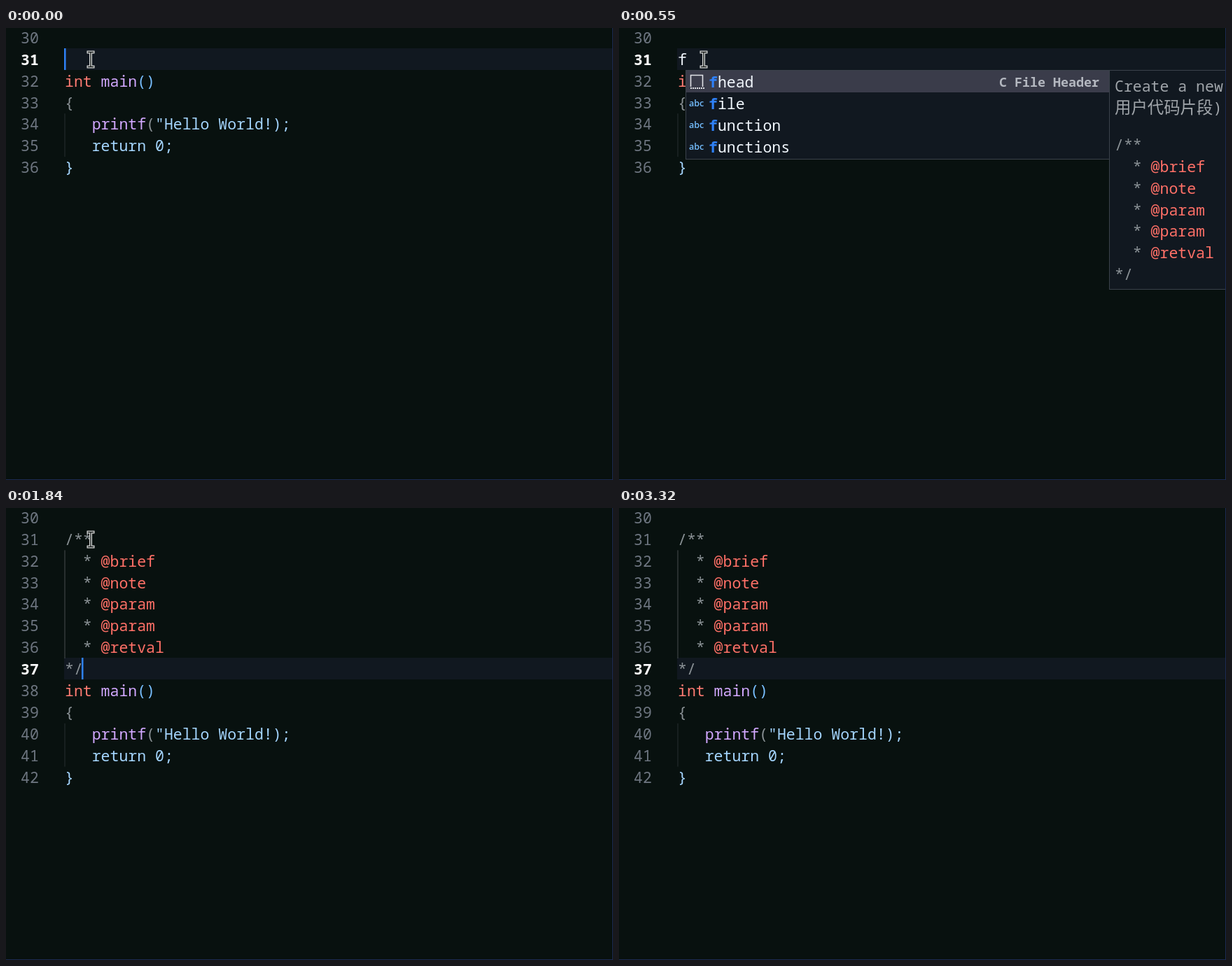
Write an HTML page with a canvas that moves like this. It is 867 px wide and 646 px high and loops after 3920 ms.

```html
<!DOCTYPE html>
<html>
<head>
<meta charset="utf-8">
<style>
html, body { margin: 0; height: 100%; overflow: hidden; background: #08110f; }
canvas { display: block; }
</style>
</head>
<body>
<canvas id="stage" width="867" height="646"></canvas>
<script>
const ctx = document.getElementById('stage').getContext('2d');
const LOOP = 3920, ROW = 30.93, CELL = 12.9, LEFT = 84;
const TYPED = 90, INSERTED = 1840;
const MONO = '"Noto Sans Mono", "DejaVu Sans Mono", monospace';
const RED = '#ff7b72', TAG = '#ff7067', PURPLE = '#d2a8ff', BLUE = '#79c0ff',
      PALE = '#a5d6ff', GRAY = '#8b9296', DIM = '#6e7681', WHITE = '#f0f6fc',
      ACCENT = '#2f81f7', PANEL = '#111820', EDGE = '#3b424b', BORDER = '#1c2a52';

const code = [
  [['int', RED], [' main', PURPLE], ['()', BLUE]],
  [['{', GRAY]],
  [['   printf', PURPLE], ['(', GRAY], ['"Hello World!);', PALE]],
  [['   return 0;', PALE]],
  [['}', PALE]]
];
const comment = [
  [['/**', GRAY]],
  ...['brief', 'note', 'param', 'param', 'retval'].map(tag => [['  * ', GRAY], ['@' + tag, TAG]]),
  [['*/', GRAY]]
];

// Spark targets relative to the caret: dx, dy, size, opacity
const sparks = [
  [-15, -55, 3, .8], [12, -52, 3, 1], [-20, -44, 3, .65], [-1, -40, 4, 1],
  [8, -22, 5, 1], [12, -23, 4, 1], [27, -24, 4, 1], [32, -20, 4, 1],
  [29, -4, 2, .4], [66, 1, 2, .4]
];
const faintSparks = [[-19, -30, 2, .3], [23, -23, 2, .35], [-22, -19, 2, .25], [19, -5, 2, .35]];

// Pointer path: time, x, y
const pointer = [
  [0, 121, 45], [2040, 121, 45], [2200, 356, 210], [2340, 520, 362],
  [2540, 520, 362], [2680, 737, 614], [2720, 790, 680]
];

const rowY = i => 14 + i * ROW;

function rect(x, y, w, h, color) {
  ctx.fillStyle = color;
  ctx.fillRect(x, y, w, h);
}

function text(str, x, midY, color, size = 21.5, weight = 500) {
  ctx.font = `${weight} ${size}px ${MONO}`;
  ctx.fillStyle = color;
  [...str].forEach((ch, i) => ctx.fillText(ch, x + i * size * .6, midY + size * .36));
}

function spans(parts, x, y) {
  for (const [str, color] of parts) {
    text(str, x, y, color);
    x += str.length * CELL;
  }
}

function frame(x, y, w, h) {
  rect(x, y, w, h, PANEL);
  ctx.strokeStyle = EDGE;
  ctx.lineWidth = 1;
  ctx.strokeRect(x + .5, y + .5, w - 1, h - 1);
}

function drawEditor(t) {
  const inserted = t >= INSERTED, typed = t >= TYPED && !inserted;
  const active = inserted ? 7 : 1;
  const top = Math.floor(rowY(active) - 15.9);
  rect(83, top, 784, 31, PANEL);

  const lines = [[], ...(inserted ? comment : [typed ? [['f', WHITE]] : []]), ...code];
  lines.forEach((parts, i) => {
    const current = i === active;
    text(String(30 + i), 21, rowY(i), current ? '#ffffff' : DIM, 21.5, current ? 600 : 500);
    spans(parts, LEFT, rowY(i));
  });
  const body = inserted ? 10 : 4;
  rect(83.5, rowY(body) - 15.5, 1, ROW * 2, '#272f30');
  if (inserted) rect(83.5, rowY(2) - 15.5, 1, ROW * 5, '#484e50');

  const caretOn = t < 550 || t >= 1080 && t < 1560 || t >= INSERTED && t < 2360 || t >= 2840 && t < 3320;
  const column = inserted ? 2 : typed ? 1 : 0;
  if (caretOn) rect(Math.round(83 + column * CELL - (column ? 1 : 0)), top, 2.5, 31, ACCENT);
}

function drawSparks(list, x, y, age) {
  if (age <= 0 || age >= 480) return;
  const u = age / 360, g = 60;
  const fade = Math.min(1, (480 - age) / 120);
  for (const [dx, dy, size, alpha] of list) {
    ctx.globalAlpha = alpha * fade;
    rect(Math.round(x + dx * u - size / 2), Math.round(y + (dy - g) * u + g * u * u - size / 2), size, size, '#ffffff');
  }
  ctx.globalAlpha = 1;
}

function drawPopup() {
  frame(95, 60, 606, 128);
  rect(96, 61, 604, 31, '#3a3c4a');
  ['fhead', 'file', 'function', 'functions'].forEach((word, i) => {
    const y = 77 + i * 31;
    text('f', 128, y, ACCENT, 21.5, 700);
    text(word.slice(1), 128 + CELL, y, WHITE);
    if (i) {
      ctx.font = '600 12.5px "Open Sans", sans-serif';
      ctx.fillStyle = '#75beff';
      ctx.fillText('abc', 100, y + 3.5);
    }
  });
  text('C File Header', 543, 77, '#b4b8c0', 18.35, 600);

  ctx.strokeStyle = '#e0e2e6';
  ctx.lineWidth = 1.6;
  ctx.beginPath();
  ctx.moveTo(102.5, 84);
  ctx.lineTo(102.5, 67.5);
  ctx.lineTo(119.5, 67.5);
  ctx.lineTo(119.5, 84);
  ctx.stroke();
  for (let x = 102; x < 121; x += 3) rect(x, 85, 2, 2, '#e0e2e6');

  frame(700, 60, 180, 314);
  text('Create a new', 708, 83, '#a0a5aa');
  ctx.font = '300 23.4px "Noto Sans CJK SC", "Noto Sans CJK", sans-serif';
  ctx.fillStyle = '#a0a5aa';
  [...'用户代码片段'].forEach((ch, i) => ctx.fillText(ch, 708 + i * 23.4, 122));
  text(')', 848.4, 114, '#a0a5aa');
  comment.forEach((parts, i) => spans(parts, 708, 167 + i * ROW));
}

function drawPointer(t) {
  const k = pointer.findIndex(p => p[0] > t);
  if (k < 0) return;
  const [t0, x0, y0] = pointer[k - 1], [t1, x1, y1] = pointer[k];
  const u = (t - t0) / (t1 - t0);
  ctx.save();
  ctx.translate(Math.round(x0 + (x1 - x0) * u), Math.round(y0 + (y1 - y0) * u));
  ctx.beginPath();
  ctx.moveTo(-3.5, -10.5);
  ctx.lineTo(3.5, -10.5);
  ctx.moveTo(0, -10.5);
  ctx.lineTo(0, 10.5);
  ctx.moveTo(-3.5, 10.5);
  ctx.lineTo(3.5, 10.5);
  ctx.lineCap = 'square';
  for (const [width, color] of [[4, '#d8dad9'], [1.4, '#151a19']]) {
    ctx.lineWidth = width;
    ctx.strokeStyle = color;
    ctx.stroke();
  }
  ctx.restore();
}

function draw(t) {
  const step = Math.floor(t / 40) * 40;
  rect(0, 0, 867, 646, '#08110f');
  drawEditor(t);
  if (t >= INSERTED) {
    drawSparks(sparks, 109, 231, step - INSERTED);
    drawSparks(faintSparks, 109, 45, step - INSERTED);
  } else if (t >= TYPED) {
    drawSparks(sparks, 96, 45, Math.floor((t - 70) / 40) * 40);
    drawPopup();
  }
  drawPointer(step);
  rect(866, 0, 1, 646, BORDER);
  rect(0, 645, 867, 1, BORDER);
}

const start = performance.now();
function tick(now) {
  draw(Math.max(0, now - start) % LOOP);
  requestAnimationFrame(tick);
}
draw(0);
requestAnimationFrame(tick);
</script>
</body>
</html>
```
